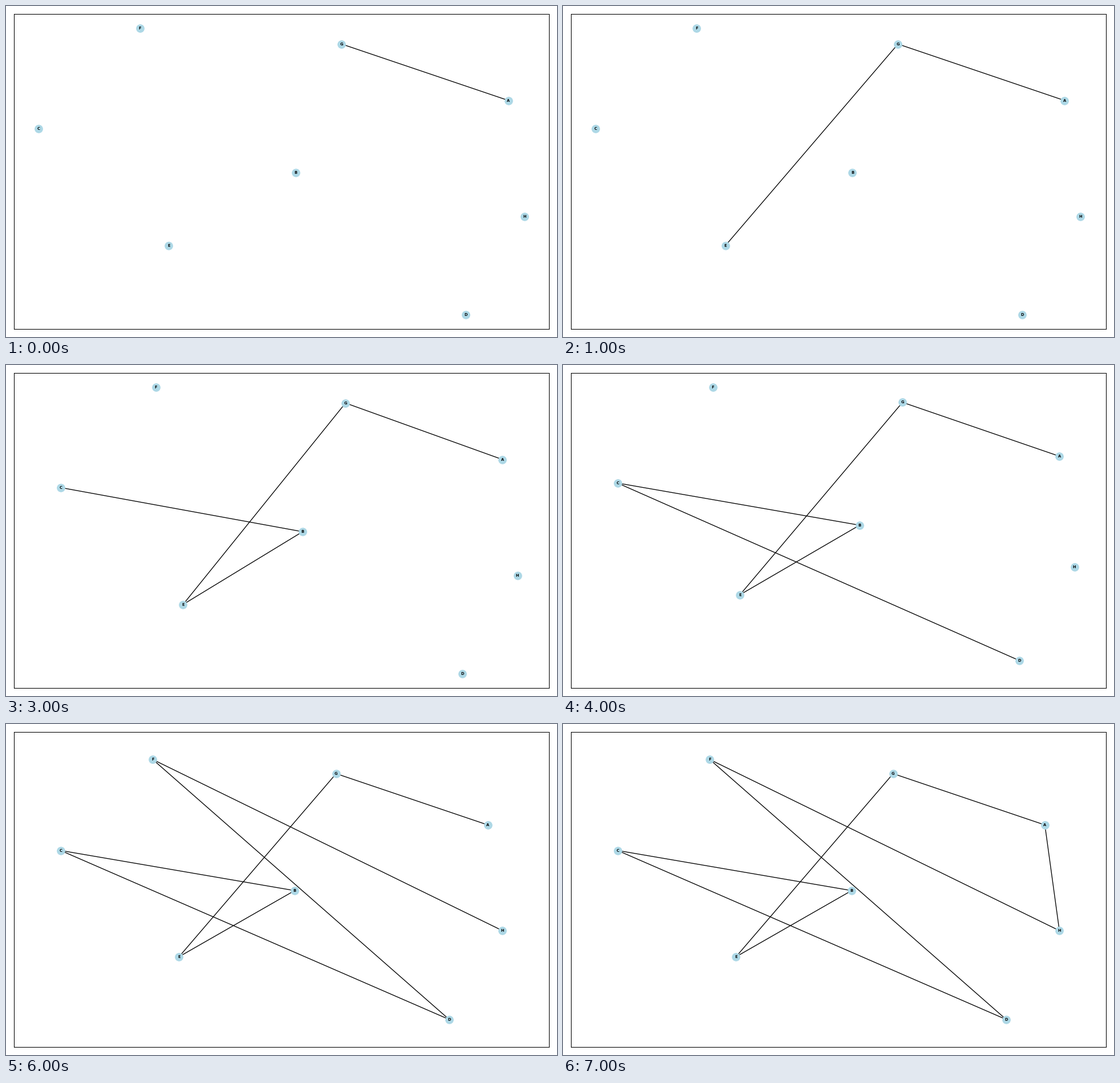
A matplotlib script that plays this animation: 966 px wide and 580 px high, repeating every 8000 ms.

```python
import matplotlib.pyplot as plt
from matplotlib.animation import FuncAnimation
from matplotlib.collections import LineCollection

W, H, DPI = 966, 580, 96
PAD = 14.4     # gap between the figure edge and the axes, in pixels
MARGIN = 0.05

# Node places, with x and y running from 0 to 1 (y downwards)
NODES = {
    "A": (0.9671, 0.2517),
    "B": (0.5297, 0.5042),
    "C": (0.0, 0.3499),
    "D": (0.8796, 1.0),
    "E": (0.268, 0.7588),
    "F": (0.2087, 0.0),
    "G": (0.6237, 0.0543),
    "H": (1.0, 0.6582),
}
TOUR = "AGEBCDFHA"


def view_limits(values):
    """Limits that hold all nodes and the padded span of the visited ones."""
    pad = MARGIN * (max(values) - min(values))
    lo = min(0, min(values) - pad)
    hi = max(1, max(values) + pad)
    edge = MARGIN * (hi - lo)
    return lo - edge, hi + edge


fig = plt.figure(figsize=(W / DPI, H / DPI), dpi=DPI, facecolor="white")
ax = fig.add_axes([PAD / W, PAD / H, 1 - 2 * PAD / W, 1 - 2 * PAD / H])
ax.set_xticks([])
ax.set_yticks([])

edges = LineCollection([], colors="black", linewidths=1, zorder=1)
ax.add_collection(edges, autolim=False)
ax.scatter(*zip(*NODES.values()), s=100, c="lightblue", edgecolors="face",
           linewidths=1, zorder=2)
for name, (x, y) in NODES.items():
    ax.text(x, y, name, size=5, weight="bold", family="DejaVu Sans",
            ha="center", va="center", zorder=3)


def draw(step):
    path = [NODES[name] for name in TOUR[:step + 2]]
    edges.set_segments(list(zip(path, path[1:])))
    xs, ys = zip(*path)
    ax.set_xlim(view_limits(xs))
    ax.set_ylim(view_limits(ys)[::-1])
    return [edges]


anim = FuncAnimation(fig, draw, frames=len(TOUR) - 1, interval=1000,
                     init_func=lambda: draw(0), repeat=True, repeat_delay=0)
plt.show()
```
